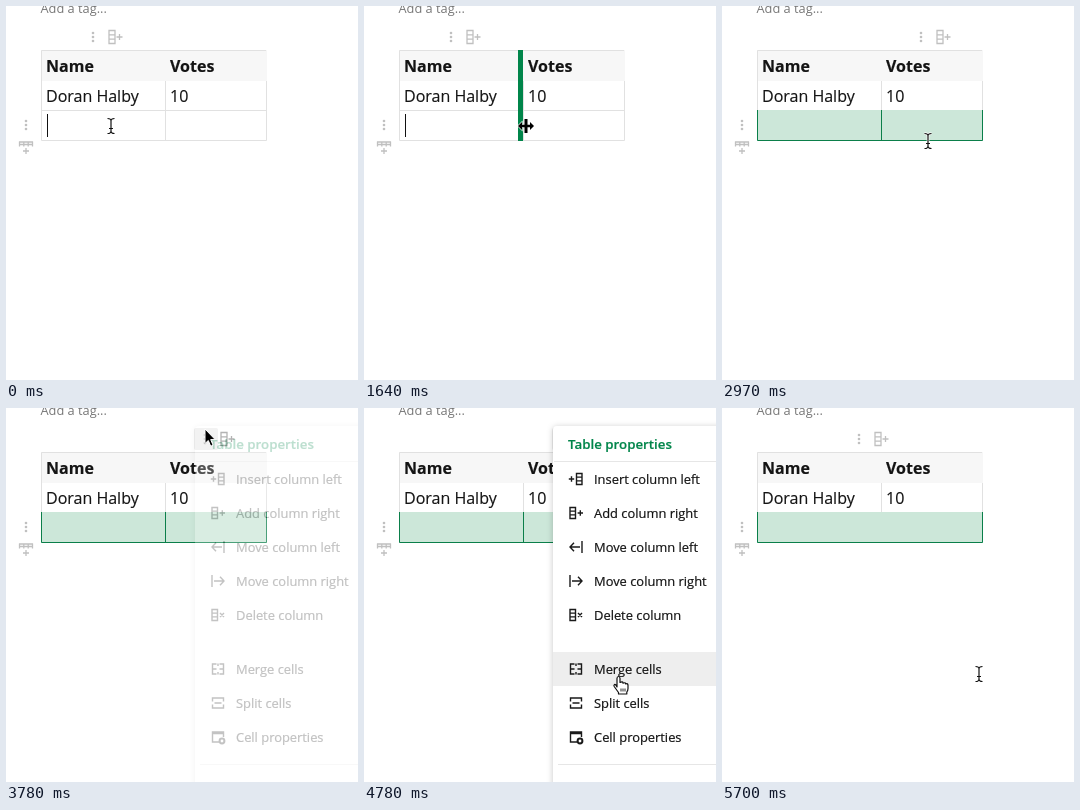
These frames come from a looping animation (352x374 px, 6.46 s). An HTML page:

```html
<!DOCTYPE html>
<html lang="en">
<head>
<meta charset="utf-8">
<title>Merging table cells</title>
<style>
html, body { margin: 0; width: 100%; height: 100%; overflow: hidden; background: #fff; }
svg { display: block; font-family: "Open Sans", "Noto Sans", sans-serif; }
.line { fill: none; stroke: #e1e1e1; }
.icon { fill: none; stroke: #1a1a1a; stroke-width: 1.4; }
.handle { fill: none; stroke: #c0c0c0; stroke-width: 1.3; }
.dots { fill: #c0c0c0; }
.hot .handle { stroke: #999; }
.hot .dots { fill: #999; }
.cell { font-size: 16px; fill: #141414; stroke: #141414; stroke-width: .15; }
.head { font-weight: 700; }
.item { font-size: 12.9px; fill: #141414; stroke: #141414; stroke-width: .2; }
.title { font-size: 13.3px; font-weight: 600; fill: #00854a; stroke: #00854a; stroke-width: .2; }
</style>
</head>
<body>
<svg id="stage" width="352" height="374" viewBox="0 0 352 374"></svg>
<script>
const LOOP = 6460;
const STEP = 80;
const GREEN = '#00854a';
const stage = document.getElementById('stage');

// A three-cell column, used by the column handle and the menu
const grid = (x, y, w, h) =>
  `M${x} ${y - h / 2}h${w}v${h}h${-w}zM${x} ${y - h / 6}h${w}M${x} ${y + h / 6}h${w}`;
const plus = (x, y, r) => `M${x - r} ${y}h${2 * r}M${x} ${y - r}v${2 * r}`;
const dots = (x, y) => [-4, 0, 4].map(d =>
  `<circle class="dots" cx="${x}" cy="${y + d}" r="1.3"/>`).join('');

// Menu icons are drawn around the origin
const items = [
  ['Insert column left', grid(0.5, 0, 5.5, 11) + plus(-4.5, 0, 2.7)],
  ['Add column right', grid(-6, 0, 5.5, 11) + plus(4.3, 0, 2.7)],
  ['Move column left', 'M6 -6V6M4 0H-6M-2 -4.3L-6 0L-2 4.3'],
  ['Move column right', 'M-6 -6V6M-4 0H6M2 -4.3L6 0L2 4.3'],
  ['Delete column', grid(-6, 0, 5.5, 11) + 'M2 -2L6 2M6 -2L2 2'],
  ['Merge cells', 'M-1.5 -5H-5.5V5H-1.5M1.5 -5H5.5V5H1.5M-5.5 0H-1.5M5.5 0H1.5M0 -5.5V-3M0 3V5.5'],
  ['Split cells', 'M-5.5 -1.5V-5H5.5V-1.5M-5.5 1.5V5H5.5V1.5M-3.5 0H3.5'],
  ['Cell properties', 'M1 5H-5.5V-5H5.5V0M-5.5 -3.5H5.5']
];
const itemY = i => 71 + 34 * i + (i > 4 ? 20 : 0);
const menuItem = ([label, d], i) => `
  <path class="icon" transform="translate(212 ${itemY(i)})" d="${d}"/>
  <text class="item" x="230" y="${itemY(i) + 5}">${label}</text>`;

const beam = 'M-3.5 -7.5Q0 -7.5 0 -5Q0 -7.5 3.5 -7.5M0 -5.5V5.5M-3.5 7.5Q0 7.5 0 5Q0 7.5 3.5 7.5M-2 2.5H2';
const cursors = {
  beam: `<g fill="none"><path d="${beam}" stroke="#fff" stroke-width="2.6"/>
    <path d="${beam}" stroke="#111" stroke-width="1.2"/></g>`,
  resize: `<path d="M-8 0L-4 -4V-1.2H-1.5V-7H1.5V-1.2H4V-4L8 0L4 4V1.2H1.5V7H-1.5V1.2H-4V4Z"
    stroke="#fff" stroke-width="1.2" paint-order="stroke"/>`,
  arrow: '<path d="M0 0V14.5L3.3 11.5L5.7 17.2L8.1 16.2L5.7 10.6H10.2Z" stroke="#fff"/>',
  hand: `<path d="M-4 2V-6.5Q-4 -8.5 -2.5 -8.5T-1 -6.5V-2.5Q2 -4 2 -1.8Q4.5 -3 4.7 -1Q7 -2 7 .5V3.5Q7 5.5 5.8 7V9H-2.5V7.5L-6.8 1.5Q-7.5 0 -6.5 -.6T-4 2Z"
    fill="#fff" stroke="#111" stroke-width="1.2" stroke-linejoin="round"/>
    <path d="M0 3.5V6.5M2 3.5V6.5M4 3.5V6.5" stroke="#111" stroke-width=".9"/>`
};

stage.innerHTML = `
  <text x="34.5" y="7" font-size="12.8" fill="#777">Add a tag...</text>
  <rect x="35" y="44" width="226" height="31" fill="#f7f7f7"/>
  <path class="line" d="M260 44.5H35.5V134.5H260.5V75M35.5 104.5H260.5M159.5 75V104"/>
  <path class="line" id="divider" d="M159.5 104V134"/>
  <g id="selection" stroke="#0b7f4a">
    <rect x="35" y="104" width="226" height="31" fill="#cce7d9" stroke="none"/>
    <path d="M35.5 104V134.5H260.5V104" fill="none"/>
    <path id="selDivider" d="M159.5 104V134"/>
  </g>
  <g class="cell">
    <text class="head" x="40" y="66">Name</text>
    <text class="head" x="164" y="66">Votes</text>
    <text x="40" y="96">Doran Halby</text>
    <text x="164" y="96">10</text>
  </g>
  <path id="caret" d="M41.5 108V131" stroke="#111"/>
  <rect id="bar" x="154" y="44" width="5" height="91" fill="${GREEN}"/>
  ${dots(20, 119)}
  <path class="handle" d="M13.5 135.5V140.5M13 138.5H27M17.8 135.5V140.5M22.2 135.5V140.5M26.5 135.5V140.5M13 136H27${plus(20, 145, 3)}"/>
  <g id="columnHandle">
    <rect id="hover" x="-11" y="20" width="24" height="22" rx="2" fill="#eee"/>
    ${dots(0, 31)}
    <path class="handle" d="${grid(16, 31, 6, 13)}${plus(26.5, 31, 3)}"/>
  </g>
  <g id="menu">
    <rect x="189" y="18" width="190" height="380" rx="4" fill="#fff"
      style="filter:drop-shadow(0 1px 3px rgba(0,0,0,.22))"/>
    <rect id="highlight" x="189" width="163" height="34" fill="#eee"/>
    <text class="title" x="204" y="41">Table properties</text>
    ${items.map(menuItem).join('')}
    <circle cx="216" cy="333" r="2.4" fill="none" stroke="#1a1a1a" stroke-width="2"/>
    <path d="M190 53.5H352M194 356.5H352" stroke="#e6e6e6"/>
  </g>
  <g id="pointer">${Object.entries(cursors).map(([k, s]) => `<g id="${k}">${s}</g>`).join('')}</g>`;

const $ = id => document.getElementById(id);
const show = (id, on) => $(id).setAttribute('visibility', on ? 'visible' : 'hidden');

// Pointer moves: start time, steps, destination
const moves = [
  [80, 3, 65, 120], [400, 5, 46, 118], [1230, 6, 162, 120], [1720, 2, 194, 120],
  [1880, 1, 198, 120], [2050, 3, 204, 120], [2970, 2, 208, 149], [3210, 5, 199, 21],
  [4620, 3, 257, 277], [4860, 2, 258, 285], [5110, 1, 259, 278], [5280, 2, 259, 275],
  [5700, 1, 257, 266]
];
const ease = u => u * u * (3 - 2 * u);

function pointerAt(t) {
  let x = 105, y = 120;
  for (const [start, steps, toX, toY] of moves) {
    if (t < start) break;
    const k = ease(Math.min(1, (Math.floor((t - start) / STEP) + 1) / steps));
    x += (toX - x) * k;
    y += (toY - y) * k;
  }
  return { x, y };
}

function render(t) {
  const { x, y } = pointerAt(t);
  const selected = t >= 1720, merged = t >= 5700;
  const resizing = t >= 1640 && !selected;
  const inMenu = t >= 4620 && !merged;
  const hovering = t >= 3450 && !merged;
  const shape = resizing ? 'resize' : inMenu ? 'hand' : y < 44 ? 'arrow' : 'beam';

  $('pointer').setAttribute('transform', `translate(${Math.round(x)} ${Math.round(y)})`);
  for (const name in cursors) show(name, name === shape);

  show('caret', t < 560 || (t >= 1230 && !selected));
  show('bar', resizing);
  show('divider', !merged);
  show('selection', selected);
  show('selDivider', selected && !merged);

  const handleX = merged ? 137 : selected ? 199 : 87;
  $('columnHandle').setAttribute('transform', `translate(${handleX} 0)`);
  $('columnHandle').setAttribute('class', hovering ? 'hot' : '');
  show('hover', hovering);

  const fade = Math.floor((t - 3780) / STEP) + 1;
  $('menu').setAttribute('opacity', merged ? 0 : ease(Math.max(0, Math.min(1, fade / 3))));

  const row = items.findIndex((_, i) => Math.abs(itemY(i) - (y - 9)) <= 17);
  show('highlight', inMenu && row >= 0);
  $('highlight').setAttribute('y', itemY(row) - 17);
}

const start = performance.now();
function tick() {
  render((performance.now() - start) % LOOP);
  requestAnimationFrame(tick);
}
tick();
</script>
</body>
</html>
```
